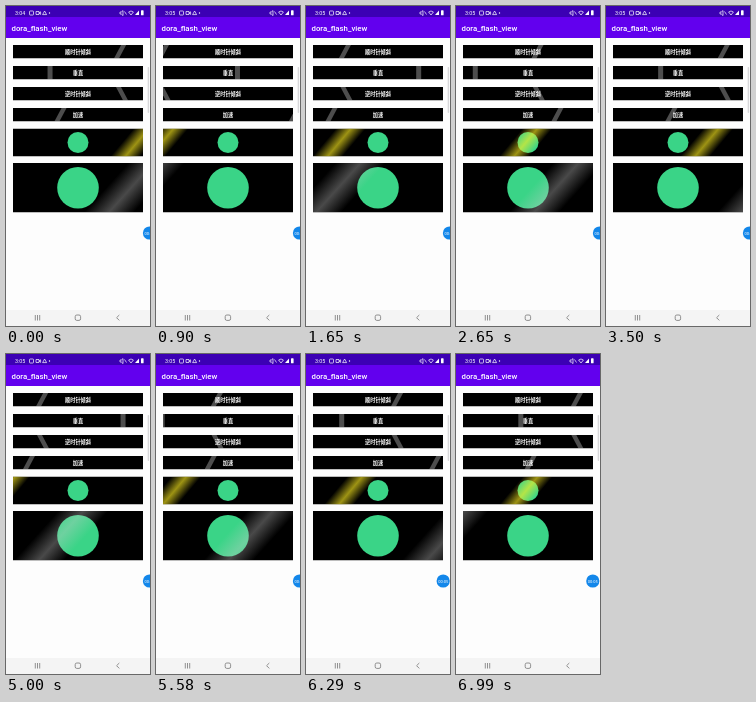
Write an HTML page that moves like this. It is 144 px wide and 320 px high and loops after 7040 ms.

```html
<!DOCTYPE html>
<html>
<head>
<meta charset="utf-8">
<style>
html, body { margin: 0; width: 100%; height: 100%; overflow: hidden; background: #fdfdfd; }
svg { display: block; }
text { fill: #fff; font-family: Roboto, "Noto Sans CJK SC", "Noto Sans CJK", sans-serif; }
.label { font: bold 5.2px "Noto Sans CJK SC", "Noto Sans CJK", sans-serif; text-anchor: middle; }
</style>
</head>
<body>
<svg id="stage" width="144" height="320" viewBox="0 0 144 320">
  <defs>
    <linearGradient id="yellow">
      <stop offset="0" stop-color="#ffee20" stop-opacity="0"/>
      <stop offset=".5" stop-color="#ffee20" stop-opacity=".62"/>
      <stop offset="1" stop-color="#ffee20" stop-opacity="0"/>
    </linearGradient>
    <linearGradient id="gray">
      <stop offset="0" stop-color="#ccc" stop-opacity="0"/>
      <stop offset=".5" stop-color="#ccc" stop-opacity=".36"/>
      <stop offset="1" stop-color="#ccc" stop-opacity="0"/>
    </linearGradient>
  </defs>
  <rect width="144" height="320" fill="#fdfdfd"/>
  <rect width="144" height="12" fill="#3c00b4"/>
  <rect y="11" width="144" height="21" fill="#6200ee"/>

  <!-- status bar -->
  <text id="clock" x="9" y="9" font-size="5.4">3:04</text>
  <g fill="none" stroke="#fff" stroke-width=".7">
    <rect x="23.5" y="5" width="4" height="4" rx=".7"/>
    <path d="M30 5.5h3v3h-3zM33 7l1.6-1.2v2.6z"/>
    <path d="M36.6 8.6l2-3.6 2 3.6z"/>
    <path d="M114 6h1.3l1.7-1.4v5L115.3 8H114zM118.5 5.5l2 3"/>
    <path d="M122.6 6q2.4-2 4.8 0L125 9z"/>
  </g>
  <circle cx="43.5" cy="7" r=".7" fill="#fff"/>
  <path d="M129 9l4-4.5V9z" fill="#fff"/>
  <rect x="135" y="4.3" width="2.6" height="5" rx=".6" fill="#fff"/>

  <text x="5.5" y="25" font-size="7.8" font-weight="500">dora_flash_view</text>
  <g id="bars"></g>
  <rect x="141.7" y="61" width="1.4" height="46" rx=".7" fill="#d8d8da"/>

  <g id="bubble">
    <circle r="6.6" fill="#1387ea"/>
    <text id="timer" y="1.5" font-size="4" text-anchor="middle">00:05</text>
  </g>

  <!-- navigation bar -->
  <rect y="304" width="144" height="16" fill="#f4f4f4"/>
  <g fill="none" stroke="#777" stroke-width=".8">
    <path d="M29.3 309v5.5M31.5 309v5.5M33.7 309v5.5M113.3 309l-2.7 2.7 2.7 2.7"/>
    <rect x="69.2" y="309" width="5.4" height="5.4" rx="1.6"/>
  </g>
</svg>
<script>
const LOOP = 7040;
const $ = id => document.getElementById(id);
const wrap = (v, min, span) => ((v - min) % span + span) % span + min;
const clamp = v => Math.min(1, Math.max(0, v));

// Band centre for a sweep at constant speed; t in seconds
const sweep = (start, speed, min, span) => t => wrap(start + speed * t, min, span);

// Two passes per cycle with changing speed
function surge(t) {
  const u = wrap(.785 + t * .293, 0, 1);
  const pass = 2 * u - .28 + .18 * Math.cos(2 * Math.PI * (u - .95));
  return wrap(pass, 0, 1) * 145 - 1;
}

const white = 'rgba(255,255,255,.3)';
const bars = [
  { y: 39, h: 13.5, label: '顺时针倾斜', w: 5, lean: -28, fill: white, at: sweep(114, 42.6, -1, 145.5) },
  { y: 60, h: 13.5, label: '垂直', w: 5, lean: 0, fill: white, at: sweep(44, 41.6, 4.5, 135) },
  { y: 81, h: 13.5, label: '逆时针倾斜', w: 5, lean: 28, fill: white, at: sweep(116, 42.4, -1, 145.5) },
  { y: 102, h: 13.5, label: '加速', w: 5, lean: -28, fill: white, at: surge },
  { y: 122.5, h: 28, icon: 10.5, w: 30, lean: -40, fill: 'url(#yellow)', at: sweep(131, 36.5, -10, 158) },
  { y: 157, h: 49.5, icon: 20.8, w: 50, lean: -42, fill: 'url(#gray)', at: sweep(125, 68, -30, 205) }
];

$('bars').innerHTML = bars.map(b => {
  const mid = b.y + b.h / 2;
  const content = b.label
    ? `<text class="label" x="72" y="${mid + 1.9}">${b.label}</text>`
    : `<circle cx="72" cy="${mid}" r="${b.icon}" fill="#3ad487"/>`;
  return `<svg x="7" y="${b.y}" width="130" height="${b.h}" viewBox="7 ${b.y} 130 ${b.h}">
    <rect x="7" y="${b.y}" width="130" height="${b.h}"/>${content}
    <rect class="band" x="${-b.w / 2}" y="${-b.h / 2}" width="${b.w}" height="${b.h}" fill="${b.fill}"/>
  </svg>`;
}).join('');
const bands = document.querySelectorAll('.band');

function draw(now) {
  const ms = now % LOOP, t = ms / 1000;
  bars.forEach((b, i) => bands[i].setAttribute('transform',
    `translate(${b.at(t)} ${b.y + b.h / 2}) skewX(${b.lean})`));
  $('clock').textContent = ms < 800 ? '3:04' : '3:05';
  const out = clamp((ms - 6100) / 250);
  $('bubble').setAttribute('transform', `translate(${143.5 - 6.7 * out * (2 - out)} 227)`);
  $('timer').textContent = '00:0' + Math.min(5, Math.floor(ms / 1200));
  requestAnimationFrame(draw);
}
draw(0);
</script>
</body>
</html>
```
